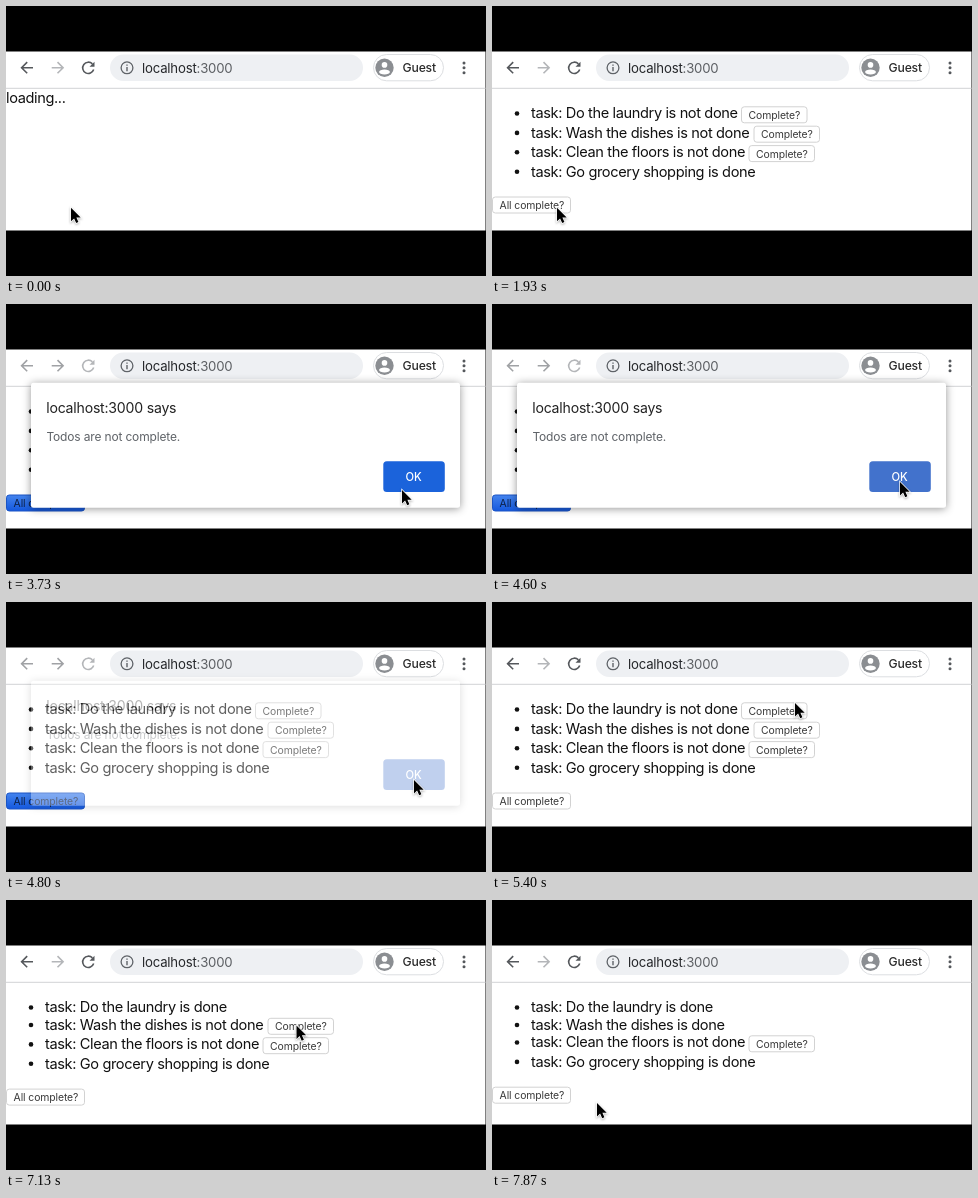
These frames come from a looping animation (480x270 px, 8000 ms). An HTML page:

```html
<!DOCTYPE html>
<html lang="en">
<head>
<meta charset="utf-8">
<title>Todo list</title>
<style>
  html, body { margin: 0; width: 100%; height: 100%; overflow: hidden; background: #000; }
  svg { display: block; width: 480px; height: 270px; }
  text { font-family: Inter, "Liberation Sans", sans-serif; white-space: pre; }
  .page { font-size: 14.6px; letter-spacing: -.38px; fill: #111; }
  .label { font-size: 10.4px; letter-spacing: -.1px; fill: #3a3a3a; }
  .url { font-size: 13.2px; letter-spacing: -.2px; fill: #25272a; }
  .guest { font-size: 12.2px; letter-spacing: -.2px; font-weight: 500; fill: #2a2a2a; }
  .title { font-size: 14.1px; letter-spacing: -.21px; fill: #222; }
  .message { font-size: 12px; letter-spacing: -.16px; fill: #5f6368; }
  .ok { font-size: 11.2px; font-weight: 500; fill: #fff; }
  .icon { fill: none; stroke-width: 1.6; }
  .button rect { fill: #fff; stroke: #d2d2d2; }
  .button.pressed rect { fill: url(#blue); stroke: #1c55c4; }
  .button.pressed text { fill: #0d2148; }
  #dialog > .sheet { filter: drop-shadow(0 1.5px 4px rgba(0, 0, 0, .42)); }
</style>
</head>
<body>
<svg id="stage" viewBox="0 0 480 270">
  <defs>
    <linearGradient id="blue" x2="0" y2="1">
      <stop stop-color="#4484ee"/>
      <stop offset="1" stop-color="#1458de"/>
    </linearGradient>
    <clipPath id="window"><rect y="45.5" width="479.5" height="179"/></clipPath>
    <clipPath id="face"><circle cx="378.5" cy="61.8" r="9.2"/></clipPath>
  </defs>
  <rect width="480" height="270"/>
  <g clip-path="url(#window)">
    <rect y="45" width="480" height="180" fill="#fff"/>
    <rect y="81.8" width="480" height="1" fill="#d2d3d5"/>
    <g class="icon">
      <path id="back" d="M27 61.7H15.8M21.2 56.1L15.6 61.7L21.2 67.3"/>
      <path id="forward" d="M45.7 61.7H57M51.5 56.1L57.1 61.7L51.5 67.3"/>
      <g id="reload">
        <path d="M86.4 57.9A5.65 5.65 0 1 0 87.7 63.6" fill="none"/>
        <path d="M88.5 55.7V60.7H83.5Z" stroke="none"/>
      </g>
    </g>
    <rect x="104" y="48.5" width="253" height="26.5" rx="13.25" fill="#eef0f3"/>
    <circle class="icon" cx="121" cy="61.8" r="5.9" stroke="#5f6368" style="stroke-width:1.3"/>
    <path d="M120.3 58.4h1.4v1.4h-1.4zM120.3 61h1.4v4.2h-1.4z" fill="#5f6368"/>
    <text class="url" x="136" y="66.5">localhost<tspan fill="#5c5f63">:3000</tspan></text>
    <rect x="367.5" y="48.5" width="70" height="26.3" rx="13.1" fill="#fff" stroke="#dcdee1"/>
    <circle cx="378.5" cy="61.8" r="9.2" fill="#8b8e92"/>
    <g clip-path="url(#face)" fill="#fff">
      <circle cx="378.5" cy="58.9" r="2.8"/>
      <ellipse cx="378.5" cy="66" rx="5.4" ry="2.6"/>
    </g>
    <text class="guest" x="396.6" y="66.4">Guest</text>
    <g fill="#55585c">
      <circle cx="458" cy="56.9" r="1.5"/>
      <circle cx="458" cy="61.8" r="1.5"/>
      <circle cx="458" cy="66.7" r="1.5"/>
    </g>
    <text id="loading" class="page" x="0" y="97.2">loading...</text>
    <g id="list"></g>
    <g id="dialog">
      <rect class="sheet" x="25" y="78.7" width="429" height="125" rx="2.5" fill="#fff"/>
      <text class="title" x="40.2" y="109.3">localhost:3000 says</text>
      <text class="message" x="40.4" y="137.2">Todos are not complete.</text>
      <rect id="okBox" x="377.3" y="157.3" width="61.5" height="30.8" rx="3.5"/>
      <text class="ok" x="407.7" y="176.8" text-anchor="middle">OK</text>
    </g>
  </g>
  <path id="cursor" d="M0 0V13.5L3.1 10.6L5.2 15.3L7.4 14.3L5.4 9.7H9.7Z" fill="#000" stroke="#fff"
    stroke-width="1.4" paint-order="stroke" style="filter:drop-shadow(0 1px 1px rgba(0,0,0,.3))"/>
</svg>
<script>
const LOOP = 8000, RATE = 15;
const $ = id => document.getElementById(id);

// All times below are ticks of 1/15 s.
const TASKS = [
  { name: 'Do the laundry', buttonX: 249.5, press: [88, 90], done: 105 },
  { name: 'Wash the dishes', buttonX: 262, press: [102, 103], done: 114 },
  { name: 'Clean the floors', buttonX: 257, done: Infinity },
  { name: 'Go grocery shopping', done: 0 }
];
const LOADED = 29, ASK = [43, 73], DIALOG = [47, 73], HOVER = 57;
const PATH = [ // tick, x, y
  [0, 65, 201.8], [51, 65, 201.8], [56, 396, 186], [63, 408, 178],
  [75, 408, 178], [81, 303, 101], [88, 295, 105], [91, 295, 105],
  [96, 293, 139], [99, 291, 124], [102, 290.5, 125.5], [113, 290.5, 125.5],
  [118, 105, 203], [120, 105, 203]
];

function add(parent, tag, attrs, text = '') {
  const el = document.createElementNS('http://www.w3.org/2000/svg', tag);
  for (const key in attrs) el.setAttribute(key, attrs[key]);
  el.textContent = text;
  return parent.appendChild(el);
}

function addButton(parent, x, y, width, label) {
  const g = add(parent, 'g', { class: 'button' });
  add(g, 'rect', { x, y, width, height: 16, rx: 2.8 });
  add(g, 'text', { class: 'label', x: x + 7.1, y: y + 12 }, label);
  return g;
}

for (const task of TASKS) {
  task.row = add($('list'), 'g', {});
  add(task.row, 'circle', { cx: 25, cy: -4.8, r: 2.3, fill: '#111' });
  task.text = add(task.row, 'text', { class: 'page', x: 39, y: 0 });
  if (task.buttonX) task.button = addButton(task.row, task.buttonX, -11.5, 65.5, 'Complete?');
}
const allButton = addButton($('list'), .5, 0, 78, 'All complete?');

const within = (n, span) => !!span && n >= span[0] && n < span[1];
const show = (el, on) => { el.style.display = on ? '' : 'none'; };
const move = (el, x, y) => el.setAttribute('transform', `translate(${x} ${y})`);

function cursorAt(n) {
  const i = Math.max(1, PATH.findIndex(p => p[0] >= n));
  const [a, x0, y0] = PATH[i - 1], [b, x1, y1] = PATH[i];
  const u = (n - a) / (b - a), e = u * u * (3 - 2 * u);
  return [x0 + (x1 - x0) * e, y0 + (y1 - y0) * e];
}

function render(n) {
  show($('loading'), n < LOADED);
  show($('list'), n >= LOADED);

  let y = 112.3;
  for (const task of TASKS) {
    const done = n >= task.done;
    move(task.row, 0, y);
    task.text.textContent = `task: ${task.name} is ${done ? '' : 'not '}done`;
    if (task.button) {
      show(task.button, !done);
      task.button.classList.toggle('pressed', within(n, task.press));
    }
    y += done ? 17.5 : 19.4;
  }
  move(allButton, 0, y + 3);
  allButton.classList.toggle('pressed', within(n, ASK));

  const open = within(n, DIALOG);
  const dark = open ? '#a0a2a5' : '#55585c';
  show($('dialog'), open);
  $('dialog').style.opacity = Math.min(1, (DIALOG[1] - n) / 3);
  $('okBox').setAttribute('fill', n < HOVER ? '#1b63db' : '#4272cc');
  $('back').setAttribute('stroke', dark);
  $('forward').setAttribute('stroke', open ? dark : '#b4b6b9');
  for (const paint of ['stroke', 'fill']) $('reload').setAttribute(paint, open ? '#b4b6b9' : dark);

  move($('cursor'), ...cursorAt(n));
}

const start = performance.now();
function frame() {
  const t = (performance.now() - start) % LOOP;
  render(Math.min(LOOP * RATE / 1000 - 1, Math.floor(t * RATE / 1000 + .08)));
  requestAnimationFrame(frame);
}
frame();
</script>
</body>
</html>
```
